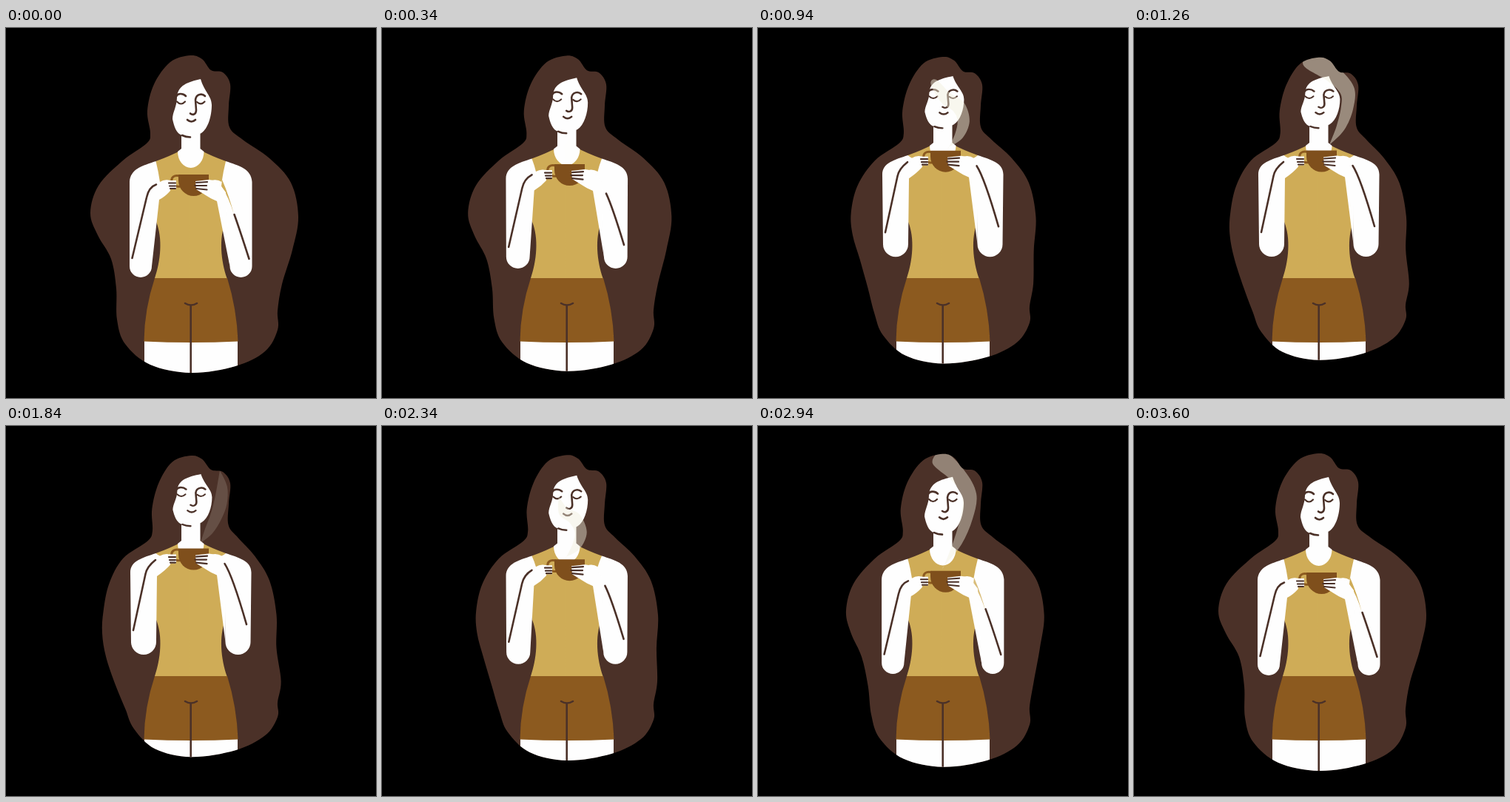
An HTML page that plays this animation: 500 px wide and 500 px high, repeating every 3640 ms.

```html
<!DOCTYPE html>
<html lang="en">
<head>
<meta charset="utf-8">
<title>Coffee break</title>
<style>
html, body { margin: 0; width: 100%; height: 100%; overflow: hidden; background: #000; }
svg { display: block; width: 100vw; height: 100vh; }
.hair { fill: #4b3128; }
.skin { fill: #fefefe; }
.top { fill: #cfac57; }
.shorts { fill: #8c5a1f; }
.cup { fill: #7f4f1c; }
.handle { fill: none; stroke: #8c5a1f; stroke-width: 3; }
.steam { fill: #f0eedc; }
.line { fill: none; stroke: #4b3128; stroke-width: 2.6; stroke-linecap: round; stroke-linejoin: round; }
.thin { stroke-width: 2.2; }
</style>
</head>
<body>
<svg viewBox="0 0 500 500">
  <defs><clipPath id="outline"><use href="#hair"/></clipPath></defs>
  <path id="hair" class="hair"/>
  <g clip-path="url(#outline)">
    <path class="skin" d="M187 415H313V475H187Z"/>
    <path class="shorts" d="M201 338Q187 380 186.500 423.500Q250 426.500 313.500 423.500Q312 380 299 338Z"/>
    <path class="line" d="M242 372Q250 377 258 372M249.700 374.500V475"/>
    <path id="shirt" class="top"/>
    <use href="#shirt" transform="translate(499.500) scale(-1 1)"/>
    <path id="neck" class="skin"/>
    <g id="face">
      <path class="skin" d="M263 69C246 73 232 77 231 94C231 106 225 114 225 123C227 132 230 143 238 145C246 148 257 146 264 142C273 136 278 119 278 104C278 92 268 86 263 69Z"/>
      <path class="line" d="M230 92.500C232 88 239 88 243 92M269 92C265 88 257 89 256 97L257 111C257 117 252 118 249 115.500M245 124Q250.500 129 256 124M238 145Q243 147.500 249 147.500"/>
      <path class="line thin" d="M231 99.500Q236.500 105.500 242 99.500M258 100Q263.500 105 268.500 99.500"/>
    </g>
    <path id="arm" class="skin"/>
    <use href="#arm" transform="translate(499.500) scale(-1 1)"/>
    <path id="gap" class="top" d="M292 205Q302 228 308 252Q301 228 291 214Z"/>
    <g class="held">
      <path class="handle" d="M235 200C227 198 223 202 224 207C225 213 229 215 236 214"/>
      <path class="skin" d="M221 206H230V218H221Z"/>
      <path class="line thin" d="M220 209.500H229M221 213.500H229M222 217H229"/>
      <path class="cup" d="M233 198H274V206A20.500 21 0 0 1 233 206Z"/>
    </g>
    <path id="hand" class="skin"/>
    <path class="held line thin" d="M257 209L272 208M255.500 213H271M257 217L271.500 218.500"/>
    <path id="sleeves" class="line"/>
    <path class="steam"/>
    <path class="steam"/>
  </g>
</svg>
<script>
const LOOP = 3640;
const $ = id => document.getElementById(id);
const setD = (id, d) => $(id).setAttribute('d', d);
const lerp = (a, b, k) => a + (b - a) * k;
const points = s => s.split(' ').map(p => p.split(',').map(Number));
const clamp = x => Math.min(1, Math.max(0, x));
const smooth = x => (x = clamp(x), x * x * (3 - 2 * x));
const bump = (y, mid, reach) => Math.exp(-(((y - mid) / reach) ** 4));

// cubic-bezier(.33, 0, .3, 1)
function glide(x) {
  x = clamp(x);
  let lo = 0, hi = 1;
  for (let i = 0; i < 22; i++) {
    const u = (lo + hi) / 2, v = 1 - u;
    if (.99 * v * v * u + .9 * v * u * u + u * u * u < x) lo = u; else hi = u;
  }
  return smooth(lo);
}

// Closed smooth curve through a list of points
function curve(pts) {
  const n = pts.length, at = i => pts[(i + n) % n];
  let d = `M${at(0)}`;
  for (let i = 0; i < n; i++) {
    const [a, b, c, e] = [at(i - 1), at(i), at(i + 1), at(i + 2)];
    d += `C${b[0] + (c[0] - a[0]) / 6} ${b[1] + (c[1] - a[1]) / 6} ` +
         `${c[0] - (e[0] - b[0]) / 6} ${c[1] - (e[1] - b[1]) / 6} ${c[0]} ${c[1]}`;
  }
  return d + 'Z';
}

const hair = points('249,37 265,42 277,57 293,60 303,76 301,105 302,134 320,151 356,176 385,209 ' +
  '395,255 387,300 373,346 367,382 367,408 350,437 310,457 250,466 195,455 161,427 150,394 ' +
  '149,352 142,312 124,280 114,250 125,213 158,179 190,156 195,142 191,112 200,76 222,46');

// Hair narrows at the sides and pulls up at the bottom
function squeeze([x, y], k) {
  const dx = x > 250
    ? -30 * bump(y, 240, 80)
    : 6.5 * bump(y, 95, 50) + 18 * bump(y, 240, 40) - 7 * bump(y, 318, 30) + 12 * bump(y, 415, 45);
  const dy = 4 * (1 - smooth(y / 120)) - 19 * smooth((y - 330) / 110);
  return [x + (x === 250 ? 0 : dx) * k, y + dy * k];
}

// lift: 0 = cup at the chest, 1 = cup at the chin
function pose(lift) {
  const p = (x, y, dx, dy) => `${x + dx * lift} ${y + dy * lift} `;
  const up = (x, y) => p(x, y, 0, -8);
  const held = (x, y) => p(x, y, 0, -32.5);
  const r = 15 + 2 * lift;

  setD('shirt', `M${up(202.5, 180)}Q${up(222, 173)}${up(237, 165)}H251V338H201C209 315 212 284 203 262Z`);
  setD('neck', `M237 125L${up(237, 163)}L${up(232, 167)}A17.75 22 0 0 0 ${up(267.5, 167)}L${up(262.5, 163)}V125Z`);
  $('face').setAttribute('transform', `matrix(1 0 0 ${1 - .105 * lift} ${.4 * lift} ${3.25 * lift})`);

  setD('arm', `M${up(202.5, 180)}C${up(185, 186)}${up(168, 190)}${p(167, 208, 1, -10)}` +
    `L${p(167, 322, 2, -30)}A${r} ${r} 0 0 0 ${p(197, 322, 6, -30)}L${p(207, 232, -3, -29)}` +
    `Q${held(215, 228)}${held(222, 220)}L${held(222, 206)}Q${held(214, 204)}${held(208, 208)}` +
    `Q${p(206, 194, 0, -19)}${up(202.5, 180)}Z`);
  setD('hand', `M${p(302.5, 322, -6, -30)}L${held(285, 234)}C${held(275, 230)}${held(264, 222)}${held(257, 218)}` +
    `L${held(256, 207)}L${held(274, 205)}C${held(285, 206)}${held(289, 211)}${held(297, 222)}Z`);
  setD('sleeves', `M${p(170.5, 311, 1.5, -35)}L${p(190, 229, -1.5, -29)}Q${p(193, 215, -2.5, -25)}${p(203, 211.5, -1, -30.5)}` +
    `M${p(308.5, 252, -13, -66)}Q${p(315, 270, -9, -68)}${p(328.5, 312, -3.5, -44)}`);

  $('gap').setAttribute('opacity', clamp(1 - 3 * lift));
  for (const el of document.querySelectorAll('.held')) el.setAttribute('transform', `translate(0 ${-32.5 * lift})`);
}

// Steam: middle line from the cup upwards; tip 1 = pointed, 0 = open
const rise = points('255,162 267,152 272,136 262,120 245,112 238,92');
const full = points('264,158 279,135 288,108 288,84 268,62 236,39');
const fade = points('263,158 274,142 284,122 290,103 292,82 289,60');
const seed = rise.map(([x, y]) => [lerp(255, x, .1), lerp(165, y, .1)]);
const puff = [
  { at: 300, line: seed, tip: 1, alpha: 0 },
  { at: 760, line: rise, tip: 1, alpha: .47 },
  { at: 1260, line: full, tip: 0, alpha: .47 },
  { at: 1840, line: fade, tip: 1, alpha: .16 },
  { at: 1950, line: fade, tip: 1, alpha: 0 }
];

function drawSteam(el, age, drop) {
  const i = puff.findIndex(key => key.at > age);
  if (i < 1) return el.setAttribute('opacity', 0);
  const a = puff[i - 1], b = puff[i], k = (age - a.at) / (b.at - a.at);
  const tip = lerp(a.tip, b.tip, k), last = a.line.length - 1;
  const mid = a.line.map(([x, y], j) => {
    const pull = drop * (1 - j / last) ** 1.6;
    return [lerp(x, b.line[j][0], k) - pull * .4, lerp(y, b.line[j][1], k) + pull];
  });
  const left = [], right = [];
  mid.forEach(([x, y], j) => {
    const u = j / last, half = 13 * Math.sqrt(u) * (1 - tip * u ** 4);
    const from = mid[Math.max(0, j - 1)], to = mid[Math.min(last, j + 1)];
    const dx = to[0] - from[0], dy = to[1] - from[1], s = half / Math.hypot(dx, dy);
    left.push([x + dy * s, y - dx * s]);
    right.unshift([x - dy * s, y + dx * s]);
  });
  el.setAttribute('d', curve(left.concat(right)));
  el.setAttribute('opacity', lerp(a.alpha, b.alpha, k));
}

const steams = document.querySelectorAll('.steam');

function draw(t) {
  const sway = smooth(t / 1560) - smooth((t - 1700) / 1900);
  const lift = glide(t / 1040) - glide((t - 1800) / 1600);
  setD('hair', curve(hair.map(pt => squeeze(pt, sway))));
  pose(lift);
  steams.forEach((el, i) => drawSteam(el, t - 1600 * i, 33 * (1 - lift)));
}

const begin = performance.now();
function tick(now) {
  draw(Math.max(0, now - begin) % LOOP);
  requestAnimationFrame(tick);
}
draw(0);
requestAnimationFrame(tick);
</script>
</body>
</html>
```
